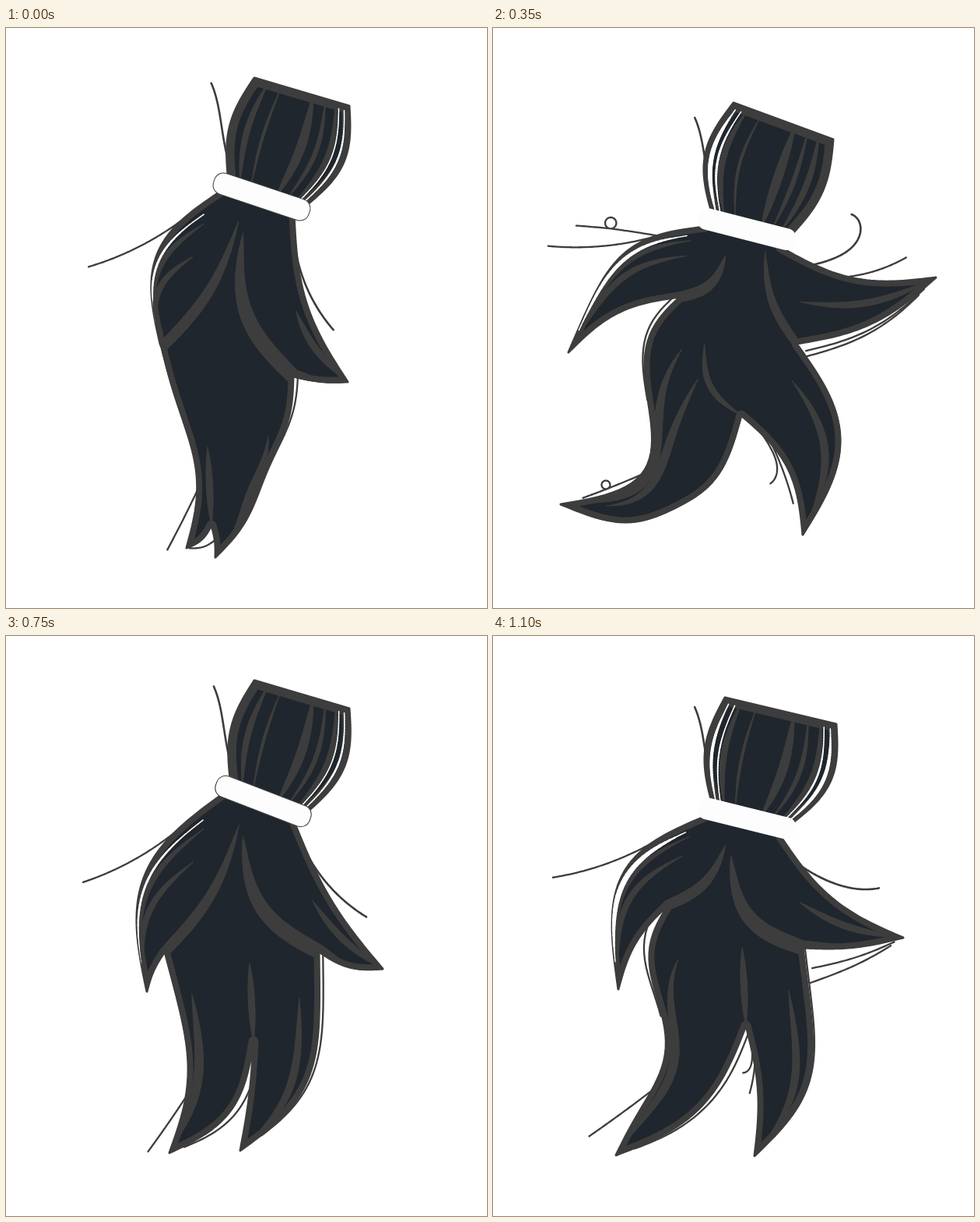
An HTML page with a canvas for the animation above (1150 ms loop, 618 by 744 pixels).

```html
<!DOCTYPE html>
<html lang="en">
<head>
<meta charset="utf-8">
<title>Swinging ponytail</title>
<style>
html, body { margin: 0; width: 100%; height: 100%; overflow: hidden; background: #fff; }
canvas { display: block; }
</style>
</head>
<body>
<canvas id="stage" width="618" height="744"></canvas>
<script>
const ctx = document.getElementById('stage').getContext('2d');
const GREY = '#3d3d3d', DARK = '#20262d', WHITE = '#fff';
const LOOP = 1150, STEP = 50, SAMPLES = 40;

// Looks of the tuft above the band: bow of each side, white gap at each side
const tight = [15, -22, 0, 2.5], open = [17, -23, 4, 5], leaning = [23, -14, 6, 0];

// band: centre and tilt; top: upper corners of the tuft.
// tips: corners from the upper left lock round to the upper right one.
// bows: how far each edge between corners swells, as sine harmonics.
const poses = {
  hang: {
    crossed: false, band: [328.5, 216.5, 18.5], top: [[319, 64], [441, 100]], sides: tight,
    tips: [[198, 405], [200, 410], [232, 667], [264, 638], [269, 679], [369, 447], [439, 454]],
    bows: [[46], [0], [-22, 6], [5], [-2], [20, 0, 4], [3], [-19]]
  },
  lifted: {
    crossed: true, band: [327.5, 213.5, 21.5], top: [[319, 57], [441, 93]], sides: tight,
    tips: [[181, 456], [204, 405], [210, 663], [318, 520], [301, 660], [402, 405], [484, 427]],
    bows: [[56], [-3], [-26, 3], [30], [-3], [46, 5], [9], [-11]]
  },
  opening: {
    crossed: false, band: [326, 234, 14], top: [[298, 79], [441, 113]], sides: open,
    tips: [[161, 453], [225, 345], [158, 666], [325, 500], [336, 667], [398, 400], [527, 387]],
    bows: [[61, 3], [-11], [-22, 16, 9], [33], [-10], [44, 6], [6], [-19]]
  },
  spread: {
    crossed: true, band: [332, 239.5, 14], top: [[302, 80], [445, 114]], sides: open,
    tips: [[127, 440], [237, 342], [111, 650], [330, 500], [384, 640], [366, 352], [578, 332]],
    bows: [[48, 12], [-17], [-42, 20, 10], [44, 5], [-21], [58, 8], [34], [-26]]
  },
  fling: {
    crossed: true, band: [326, 258, 14.3], top: [[309, 96], [437, 143]], sides: leaning,
    tips: [[97, 416], [240, 345], [87, 611], [319, 497], [398, 650], [390, 405], [569, 320]],
    bows: [[44, 5], [-17], [-45, 37], [75, 0, 6], [-22], [52], [18], [-21]]
  },
  peak: {
    crossed: false, band: [326, 258, 14.3], top: [[309, 96], [437, 143]], sides: leaning,
    tips: [[71, 404], [243, 347], [61, 548], [320, 490], [413, 652], [380, 398], [559, 296]],
    bows: [[40, 4], [-20], [-60, 44, -9], [109, 0, 18], [-28], [65, 0, 4], [20], [-25, -6]]
  }
};
const raise = ([x, y]) => [x, y - 8];
const { hang, lifted } = poses;
poses.hop = { ...hang, band: [328.5, 208.5, 18.5], top: hang.top.map(raise), tips: hang.tips.map(raise) };
poses.rise = { ...lifted, crossed: false, band: [330.5, 212, 21] };

const keys = [
  [0, 'hang'], [50, 'hop'], [150, 'rise'], [200, 'opening'], [250, 'spread'], [350, 'fling'],
  [450, 'fling'], [500, 'spread'], [550, 'opening'], [600, 'lifted'], [650, 'hop'], [700, 'hop'],
  [750, 'rise'], [800, 'opening'], [850, 'spread'], [950, 'peak'], [1050, 'spread'],
  [1100, 'opening'], [LOOP, 'hang']
];

const blend = (a, b, k) => Array.isArray(a) ? a.map((v, i) => blend(v, b[i], k)) : a + (b - a) * k;
const clamp = (v, low, high) => Math.max(low, Math.min(high, v));

for (const p of Object.values(poses)) p.bows = p.bows.map(([a, b = 0, c = 0]) => [a, b, c]);

function poseAt(time) {
  const i = keys.findIndex((key, n) => time < keys[n + 1][0]);
  const [t0, a] = keys[i], [t1, b] = keys[i + 1];
  const k = (time - t0) / (t1 - t0), from = poses[a], to = poses[b];
  const pose = { crossed: (k < 0.5 ? from : to).crossed };
  for (const part of ['band', 'top', 'sides', 'tips', 'bows']) pose[part] = blend(from[part], to[part], k);
  return pose;
}

// Line from a to b, swelling sideways by a sum of sines
function curve(a, b, swell) {
  const dx = b[0] - a[0], dy = b[1] - a[1], len = Math.hypot(dx, dy) || 1;
  return Array.from({ length: SAMPLES + 1 }, (_, i) => {
    const t = i / SAMPLES;
    const off = swell.reduce((sum, h, n) => sum + h * Math.sin((n + 1) * Math.PI * t), 0) / len;
    return [a[0] + dx * t - dy * off, a[1] + dy * t + dx * off];
  });
}

// Strand running between two edges, f of the way across
const between = ([a, b], f, t0, t1) =>
  a.map((p, i) => blend(p, b[i], f)).slice(Math.round(t0 * SAMPLES), Math.round(t1 * SAMPLES) + 1);

// Loose hair leaving an edge: flares off, bends, hooks at the end, may loop once
function flyaway(edge, t, length, flare, bend, hook = 0, loop = false) {
  const i = Math.round(t * SAMPLES), [x0, y0] = edge[i], [x1, y1] = edge[i + 1];
  return walk([x0, y0], Math.atan2(y1 - y0, x1 - x0) + flare, length, bend, hook, loop);
}

function walk([x, y], heading, length, bend, hook, loop) {
  const pts = [[x, y]], steps = 60;
  for (let i = 0; i < steps; i++) {
    const s = i / steps, turn = loop ? 2 * Math.PI * clamp((s - 0.4) / 0.3, 0, 1) : 0;
    const angle = heading + bend * s + hook * s ** 3 + turn;
    x += Math.cos(angle) * length / steps;
    y += Math.sin(angle) * length / steps;
    pts.push([x, y]);
  }
  return pts;
}

function trace(pts) {
  const path = new Path2D();
  pts.forEach(p => path.lineTo(...p));
  return path;
}

function hair(pts, width = 2.3) {
  ctx.strokeStyle = GREY;
  ctx.lineWidth = width;
  ctx.stroke(trace(pts));
}

function strand(pts, width, color = GREY) {
  ctx.strokeStyle = color;
  for (let i = 1; i < pts.length; i++) {
    ctx.lineWidth = Math.max(1.5, width * Math.sin(Math.PI * (i - 0.5) / (pts.length - 1)) ** 0.7);
    ctx.stroke(trace([pts[i - 1], pts[i]]));
  }
}

// Dark shape with a grey rim; inner strands stay inside it
function drawShape(rim, anchor, border, inner) {
  const path = trace(rim), area = new Path2D(path);
  area.lineTo(...anchor);
  ctx.save();
  ctx.fillStyle = DARK;
  ctx.fill(area);
  hair(rim, 3);
  ctx.clip(area);
  hair(rim, border);
  inner();
  ctx.restore();
}

function drawBody({ crossed, tips, bows }, at) {
  const corners = [at(-52, 10), ...tips, at(48, 12)];
  const edges = bows.map((swell, i) => curve(corners[i], corners[i + 1], swell));
  const back = i => [...edges[i]].reverse();
  const upLeft = [edges[0], back(1)], lowLeft = [edges[2], back(3)];
  const lowRight = [back(5), edges[4]], upRight = [back(7), edges[6]];
  const [, leftFork, , midFork, , rightFork, rightTip] = tips;

  // How far the locks are thrown up, and how far stray hair parts from them
  const lift = clamp(1 - (rightTip[1] - corners[8][1] - 66) / 120, 0, 1.4);
  const loose = 2.2 * lift * (1.4 - lift), calm = Math.max(0, 1 - lift), reach = Math.min(lift, 1);

  hair(flyaway(upLeft[0], 0.25, 135, 0.12, 0.35));
  if (crossed) hair(flyaway(upLeft[0], 0.22, 150, 0.5, -0.1, 0, true));
  hair(flyaway(lowLeft[0], 0.72, 85 + 30 * reach, 0.4, 0.05, 0, lift > 1.1));
  hair(flyaway(upRight[0], 0.22, 105, -0.1 - 0.45 * lift, -0.5, -1.4 * lift ** 2), 2.6);
  if (crossed) hair(flyaway(upRight[0], 0.45, 80 * reach, -0.35, -0.4));
  hair(flyaway(lowRight[1], 0.2, 70 * reach, 0.2, 0.2, 1.4));
  hair(flyaway(lowRight[1], 0.3, 80 * reach, 0.25, 0.2));
  hair(between(upRight, 1 + 0.2 * loose, 0.05, 0.9));
  hair(between(upRight, 1 + 0.33 * loose, 0, 0.85));
  hair(between(lowLeft, -0.07 * loose, 0, 0.45));
  hair(between(lowLeft, 1 + 0.08 * calm, 0, 0.9));
  hair(between(lowRight, -0.06 * calm, 0, 0.9));

  drawShape(edges.flat(), at(0, 0), 13, () => {
    strand(between(upLeft, 0.18, 0.05, 0.95), 8);
    strand(between(upLeft, 0.1, 0.08, 0.88), 3 + 4 * loose, WHITE);
    strand(between(upLeft, 0.4, 0.05, 0.9), 8);
    strand(between(lowLeft, 0.27, 0.1, 0.92), 12);
    if (crossed) strand(between(lowLeft, 0.5, 0.1, 0.85), 11);
    strand(between(lowRight, 0.3, 0.1, 0.92), 10);
    strand(between(upRight, 0.55, 0.08, 0.96), 9);

    // Creases run from the middle of the body into the forks
    const crease = (start, fork, swell, edge, width) =>
      strand([...curve(start, fork, [swell]), ...edge.slice(1, SAMPLES * 0.6)], width);
    crease(at(-18, 40), leftFork, -14, upLeft[1], 14);
    if (crossed) {
      crease(at(30, 22), rightFork, 12, upRight[1], 11);
      strand(curve(blend(leftFork, midFork, 0.4), midFork, [18]), 8);
    } else {
      crease(at(-8, 52), rightFork, 30, upRight[1], 20);
      strand(curve([midFork[0] - 5, midFork[1] - 100], midFork, [0]), 9);
    }
  });
}

function drawTop({ top: [tl, tr], sides: [bowLeft, bowRight, gapLeft, gapRight] }, at) {
  const left = curve(tl, at(-48, -8), [bowLeft]), right = curve(tr, at(58, -8), [bowRight]);
  const gap = (f, width) => {
    if (width < 1) return;
    for (const n of [1, 2]) {
      const side = n * 0.055;
      strand(between([left, right], f ? 1 - side : side, 0.04, 1), width / n, WHITE);
    }
  };
  hair(walk(at(-44, -14), -1.9, 122, 0.5, -0.6), 2.6);
  drawShape([...left].reverse().concat(right), at(0, 0), 20, () => {
    for (const [f, width] of [[0.15, 8], [0.29, 4], [0.62, 12], [0.75, 6], [0.86, 8]])
      strand(between([left, right], f, 0, 1), width);
    gap(0, gapLeft);
    gap(1, gapRight);
  });
}

function drawBand([x, y, tilt], inked) {
  ctx.save();
  ctx.translate(x, y);
  ctx.rotate(tilt * Math.PI / 180);
  ctx.beginPath();
  ctx.roundRect(-64.5, -14, 129, 28, 12);
  ctx.fillStyle = '#fdfdfd';
  ctx.fill();
  ctx.strokeStyle = GREY;
  ctx.lineWidth = 1;
  if (inked) ctx.stroke();
  ctx.restore();
}

function draw(time) {
  const pose = poseAt(time), [x, y, tilt] = pose.band;
  const cos = Math.cos(tilt * Math.PI / 180), sin = Math.sin(tilt * Math.PI / 180);
  const at = (along, down) => [x + along * cos - down * sin, y + along * sin + down * cos];
  ctx.fillStyle = WHITE;
  ctx.fillRect(0, 0, 618, 744);
  ctx.lineCap = ctx.lineJoin = 'round';
  drawBody(pose, at);
  drawTop(pose, at);
  drawBand(pose.band, tilt > 16);
}

const start = performance.now();
function tick() {
  const time = (performance.now() - start) % LOOP;
  draw(Math.floor(time / STEP) * STEP);
  requestAnimationFrame(tick);
}
tick();
</script>
</body>
</html>
```
